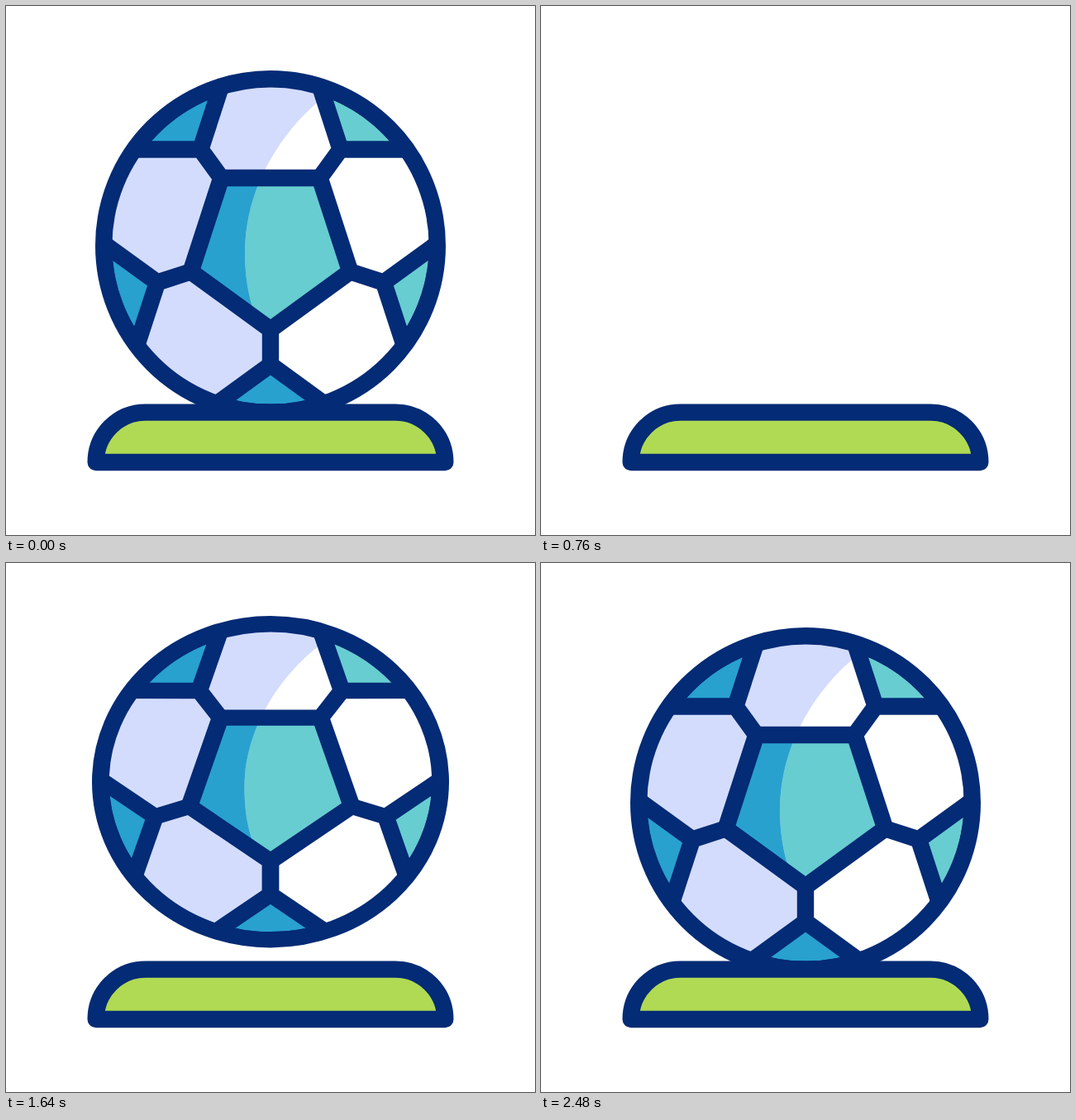
Recreate the animation shown at these times as an HTML page without scripts. Size 640 by 640 pixels, loop 2600 ms.

```html
<!DOCTYPE html>
<html lang="en">
<head>
<meta charset="utf-8">
<title>Football</title>
<style>
  html, body { margin: 0; height: 100%; overflow: hidden; background: #fff; }
  svg { display: block; width: 100vw; height: 100vh; }

  .line { fill: none; stroke: #042b75; stroke-width: 20.4; }
  .white { fill: #fff; }
  .lavender { fill: #d3dcfd; }
  .teal { fill: #67cdd1; }
  .blue { fill: #28a1cf; }
  .base { fill: #b0da53; stroke-linejoin: round; }

  .roll, .drop, .spin { animation: 2.6s linear infinite; transform-origin: 0 0; }
  .roll {
    offset-path: path("M0 0C180 -11 412 11 532 95");
    offset-rotate: 0deg;
    offset-anchor: 0 0;
    animation-name: roll;
  }
  .drop { animation-name: drop, squash; }
  .spin { animation-name: spin; }

  @keyframes roll {
    0% { offset-distance: 0%; }
    4.62% { offset-distance: 0%; animation-timing-function: cubic-bezier(.65, 0, .82, .97); }
    29.23%, 50% { offset-distance: 100%; }
    50.01%, 100% { offset-distance: 0%; }
  }
  @keyframes spin {
    0% { rotate: 0deg; }
    4.62% { rotate: 0deg; animation-timing-function: cubic-bezier(.65, 0, .82, .97); }
    29.23%, 50% { rotate: 67deg; }
    50.01%, 100% { rotate: 0deg; }
  }
  @keyframes drop {
    0%, 50% { translate: 0 0; }
    50.01% { translate: 0 -505px; animation-timing-function: cubic-bezier(.5, 0, .9, .7); }
    58.46% { translate: 0 20px; animation-timing-function: cubic-bezier(.25, .7, .6, 1); }
    67.69% { translate: 0 -35.4px; animation-timing-function: cubic-bezier(.333, 0, .667, .333); }
    76.92% { translate: 0 0; animation-timing-function: ease-out; }
    80% { translate: 0 7px; animation-timing-function: ease-in-out; }
    86.15% { translate: 0 -5px; animation-timing-function: ease-in-out; }
    92.31%, 100% { translate: 0 0; }
  }
  @keyframes squash {
    0%, 56.92% { scale: 1 1; }
    58.46% { scale: 1.038 .892; }
    67.69%, 76.92% { scale: 1 1; }
    80% { scale: 1.013 .967; }
    86.15%, 100% { scale: 1 1; }
  }
</style>
</head>
<body>
<svg viewBox="0 0 640 640">
  <defs>
    <path id="arm" d="M0 101.4V144M0 144L65 191.3A202 202 0 0 1 -65 191.3Z"/>
    <g id="patches">
      <path d="M0 101.4L-96.4 31.3L-59.6 -82H59.6L96.4 31.3Z"/>
      <use href="#arm"/>
      <use href="#arm" transform="rotate(72)"/>
      <use href="#arm" transform="rotate(144)"/>
      <use href="#arm" transform="rotate(216)"/>
      <use href="#arm" transform="rotate(288)"/>
    </g>
    <circle id="disc" r="201.8"/>
    <clipPath id="inside"><use href="#disc"/></clipPath>
    <clipPath id="shade">
      <path d="M75 -187C20 -150 -31 -75 -31 8C-31 36 -27 60 -20 80L0 101V144L75 198V230H-230V-230H75Z"/>
    </clipPath>
  </defs>

  <g transform="translate(320 290)">
    <g class="roll"><g class="drop"><g class="spin">
      <use href="#disc" class="white"/>
      <use href="#patches" class="teal"/>
      <g clip-path="url(#shade)">
        <use href="#disc" class="lavender"/>
        <use href="#patches" class="blue"/>
      </g>
      <g class="line">
        <g clip-path="url(#inside)"><use href="#patches"/></g>
        <use href="#disc"/>
      </g>
    </g></g></g>
  </g>

  <path class="line base" d="M108.7 552A60 60.4 0 0 1 168.7 491.6H471.3A60 60.4 0 0 1 531.3 552Z"/>
</svg>
</body>
</html>
```
